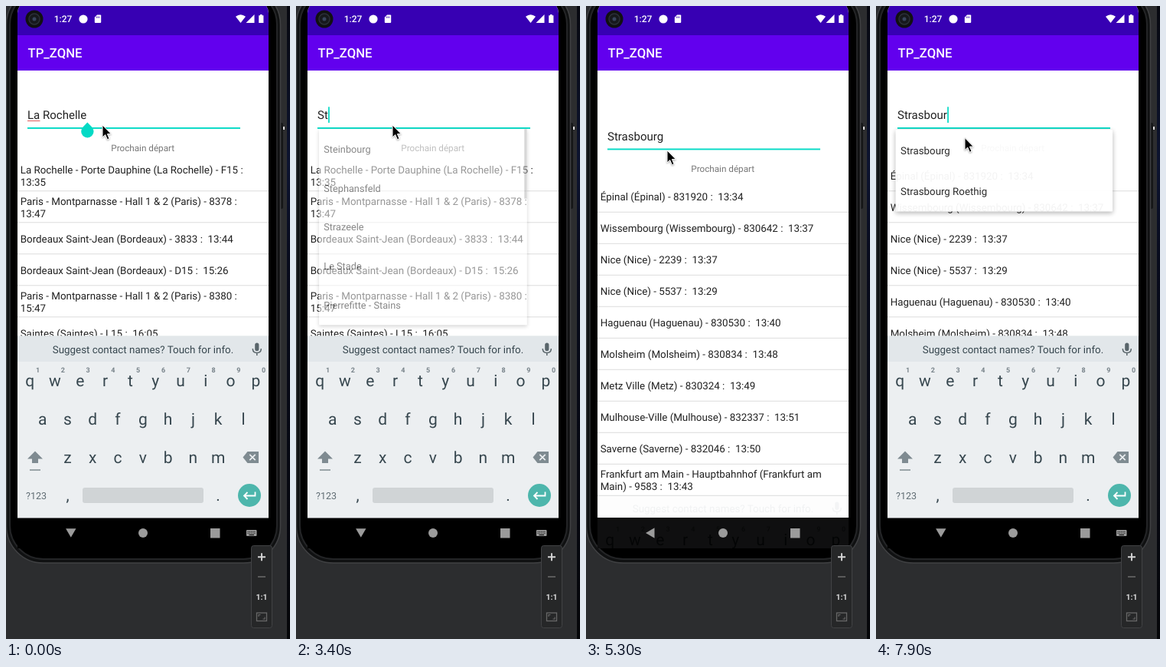
An HTML page for the animation above (8 s loop, 371x824 px).

```html
<!DOCTYPE html>
<html lang="fr">
<head>
<meta charset="utf-8">
<title>Prochain départ</title>
<style>
  html, body { margin: 0; width: 100%; height: 100%; overflow: hidden; background: #2c2d2f; }
  svg { display: block; width: 100vw; height: 100vh; }
  text { font-family: Roboto, sans-serif; white-space: pre; text-rendering: geometricPrecision; }
  .body { font-size: 13.36px; fill: #212121; }
  .mid { text-anchor: middle; }
  .key { font-size: 21px; fill: #37474f; text-anchor: middle; }
  .digit { font-size: 9px; font-weight: 700; fill: #78838a; text-anchor: middle; }
  #card { filter: drop-shadow(0 2px 3px rgba(0, 0, 0, .32)); }
</style>
</head>
<body>
<svg viewBox="0 0 371 824">
  <defs>
    <linearGradient id="night" x2="0" y2="1">
      <stop offset="0" stop-color="#07080f"/>
      <stop offset=".25" stop-color="#0d1430"/>
      <stop offset=".4" stop-color="#080b1c"/>
      <stop offset="1" stop-color="#050609"/>
    </linearGradient>
    <clipPath id="app"><rect x="15" y="84" width="328" height="582"/></clipPath>
    <clipPath id="aboveKeys"><rect x="15" y="84" width="328" height="345.5"/></clipPath>
    <clipPath id="display"><rect x="15" y="0" width="328" height="706"/></clipPath>
  </defs>

  <!-- emulator window and phone body -->
  <rect width="371" height="824" fill="#2c2d2f"/>
  <rect x="367" width="4" height="824" fill="url(#night)"/>
  <rect x="357" y="152" width="5" height="112" rx="2" fill="#151617"/>
  <rect x="362" y="157" width="2" height="4" fill="#ddd"/>
  <rect x=".5" y="-24" width="358" height="749" rx="48" fill="#101112" stroke="#404143" stroke-width="1.5"/>
  <rect x="5" y="-20" width="349" height="740" rx="44" fill="#000" stroke="#242527" stroke-width="2"/>

  <!-- screen -->
  <path d="M15 666V9Q15 4 18 0H340Q343 4 343 9V666Z" fill="#fff"/>
  <g clip-path="url(#app)">
    <g id="page">
      <text id="field" x="28" y="147.3" font-size="15.03" fill="#212121"/>
      <text id="hint" x="28" y="147.3" font-size="15.03" fill="#808080">Ville</text>
      <path id="typo" d="M28 149.5H44.5" stroke="#e57373" stroke-width="1.3"/>
      <rect x="28" y="158" width="278" height="1.9" fill="#03dac5"/>
      <rect id="caret" y="131.3" width="1.7" height="20.7" fill="#03dac5"/>
      <text class="mid" x="178.7" y="188.8" font-size="11.69" fill="#757575">Prochain départ</text>
      <g id="departures"></g>
      <path id="handle" d="M0 151.5L5.8 157.4A8.2 8.2 0 1 1 -5.8 157.4Z" fill="#03dac5"/>
    </g>
  </g>
  <g clip-path="url(#aboveKeys)">
    <g id="popup">
      <rect id="card" x="25" y="161" width="285" fill="#fff" rx="1"/>
      <g id="choices"></g>
      <rect id="bar" x="306.3" y="161" width="3.5" fill="#b4b4b4"/>
    </g>
  </g>
  <path d="M15 38V9Q15 4 18 0H340Q343 4 343 9V38Z" fill="#3700b3"/>
  <rect x="15" y="38" width="328" height="46" fill="#6200ee"/>
  <text x="28.5" y="67" font-size="16.7" font-weight="500" fill="#fff">TP_ZQNE</text>

  <!-- status bar -->
  <circle cx="37" cy="17" r="11.5" fill="#111"/>
  <circle cx="37" cy="17" r="7" fill="#17191d" stroke="#2c3038" stroke-width="1.5"/>
  <circle cx="37" cy="17" r="2.5" fill="#39455c"/>
  <g fill="#fff">
    <text x="62.8" y="21.2" font-size="12" font-weight="500">1:27</text>
    <circle cx="101" cy="17" r="5.6"/>
    <path d="M119 11.5H123.2Q124.2 11.5 124.2 12.5V21Q124.2 22 123.2 22H116.8Q115.8 22 115.8 21V14.7Z"/>
    <path d="M300 13.8Q306.5 8.8 313 13.8L306.5 22Z"/>
    <path d="M324.5 11V22H313.5Z"/>
    <path d="M332 11H334.6V12.3H336.4V22H330.2V12.3H332Z"/>
  </g>
  <path d="M118.2 13.6V15.6M120 13.6V15.6M121.8 13.6V15.6" stroke="#3700b3" stroke-width=".9"/>

  <!-- navigation bar and keyboard -->
  <rect x="15" y="666" width="328" height="40" fill="#000"/>
  <g clip-path="url(#display)"><g id="keyboard"></g></g>
  <g fill="#9b9b9b">
    <path id="back" d="M78 686L89.5 679.3V692.7Z"/>
    <circle cx="179" cy="686" r="6"/>
    <rect x="267" y="680" width="12.5" height="12.5"/>
    <g id="imeIcon">
      <rect x="314" y="682" width="13.5" height="8" rx="1"/>
      <path d="M315.5 684.2H326.5M315.5 686.3H326.5" stroke="#000" stroke-width="1" stroke-dasharray="1.2 1"/>
      <path d="M317.5 688.5H324" stroke="#000"/>
    </g>
  </g>

  <!-- emulator zoom buttons -->
  <g fill="none" stroke="#686868" stroke-width="1.6">
    <rect x="320.5" y="702.5" width="27" height="107" rx="3" fill="#262728" stroke="#414244" stroke-width="1"/>
    <path d="M329 717.2H339M334 712.2V722.2" stroke="#d5d5d5" stroke-width="1.9"/>
    <path d="M329 743H339"/>
    <rect x="327.5" y="790" width="13" height="10.5" stroke-width="1.3"/>
    <path d="M330 795V792.5H332.5M335.5 798H338V795.5" stroke-width="1.1"/>
  </g>
  <text class="mid" x="334" y="773" font-size="10.5" font-weight="700" fill="#d8d8d8">1:1</text>

  <path id="mouse" d="M0 0V16L3.7 12.6L6.4 18.8L9 17.7L6.4 11.6H11.3Z" fill="#000" stroke="#fff" stroke-width="1"
        style="filter: drop-shadow(0 1px 1px rgba(0, 0, 0, .35))"/>
</svg>

<script>
const LOOP = 8000, TICK = 100;
const $ = id => document.getElementById(id);
const label = (x, y, s, cls, more = '') => `<text x="${x}" y="${y}" class="${cls}" ${more}>${s}</text>`;
const clamp = v => Math.max(0, Math.min(1, v));

const ROCHELLE = [
  'La Rochelle - Porte Dauphine (La Rochelle) - F15 :|13:35',
  'Paris - Montparnasse - Hall 1 &amp; 2 (Paris) - 8378 :|13:47',
  'Bordeaux Saint-Jean (Bordeaux) - 3833 :  13:44',
  'Bordeaux Saint-Jean (Bordeaux) - D15 :  15:26',
  'Paris - Montparnasse - Hall 1 &amp; 2 (Paris) - 8380 :|15:47',
  'Saintes (Saintes) - L15 :  16:05'
];
const STRASBOURG = [
  'Épinal (Épinal) - 831920 :  13:34',
  'Wissembourg (Wissembourg) - 830642 :  13:37',
  'Nice (Nice) - 2239 :  13:37',
  'Nice (Nice) - 5537 :  13:29',
  'Haguenau (Haguenau) - 830530 :  13:40',
  'Molsheim (Molsheim) - 830834 :  13:48',
  'Metz Ville (Metz) - 830324 :  13:49',
  'Mulhouse-Ville (Mulhouse) - 832337 :  13:51',
  'Saverne (Saverne) - 832046 :  13:50',
  'Frankfurt am Main - Hauptbahnhof (Frankfurt am|Main) - 9583 :  13:43'
];

// Tracks hold [start time, value...]; the last entry already started applies.
const typed = [
  [0, 'La Rochelle'], [700, 'La Rochell'], [800, 'La Rochel'], [900, 'La Roche'], [1500, 'La Roch'],
  [2000, 'La Roc'], [2100, 'La Ro'], [2200, 'La R'], [2300, 'La '], [2400, 'La'], [2700, ''],
  [3100, 'S'], [3400, 'St'], [3700, 'Str'], [3900, 'Stra'], [4000, 'Stras'],
  [4800, 'Strasbourg'], [7700, 'Strasbour']
];
const pair = ['Strasbourg', 'Strasbourg Roethig'];
const suggested = [
  [0, [], 0],
  [800, ['La Rochelle Porte Dauphine', 'La Rochelle'], 0],
  [900, ['La Rochefoucauld', 'La Rochelle Porte Dauphine', 'La Roche-sur-Yon', 'La Rochelle', 'La Roche-Maurice'], 225],
  [2300, ['La Rochefoucauld', 'La Ciotat', 'La Souterraine', 'La Rochelle', 'La Verpillière'], 60],
  [2700, [], 0],
  [3400, ['Steinbourg', 'Stephansfeld', 'Strazeele', 'Le Stade', 'Pierrefitte - Stains'], 95],
  [3800, ['Strazeele', 'Strasbourg', 'Strasbourg Roethig'], 0],
  [4000, pair, 0], [5000, [], 0], [7800, pair, 0]
];
const caretTrack = [
  [0, 0], [200, 1], [1400, 0], [1500, 1], [4500, 0], [4800, 1],
  [5300, 0], [5900, 1], [6400, 0], [6900, 1], [7400, 0], [7700, 1]
];
const mouseTrack = [
  [0, 126, 155], [4300, 128, 155], [4400, 122, 166], [4500, 111, 181], [4600, 106, 188],
  [6100, 112, 176], [6200, 116, 171.5]
];
const at = (track, t) => track.findLast(entry => entry[0] <= t);

function drawKeyboard() {
  const row = (letters, x, y) => [...letters].map((c, i) => label(x + 32.8 * i, y, c, 'key')).join('');
  $('keyboard').innerHTML = `
    <rect x="15" y="429.5" width="328" height="237" fill="#eceff1"/>
    <rect x="15" y="429.5" width="328" height="33.5" fill="#e2e7ea"/>
    ${label(179, 452, 'Suggest contact names? Touch for info.', 'body mid', 'style="fill:#37474f"')}
    <rect x="325.2" y="438.5" width="5.2" height="10.5" rx="2.6" fill="#59656b"/>
    <path d="M322.3 446Q322.3 451.5 327.8 451.5T333.3 446M327.8 451.5V455" fill="none" stroke="#59656b" stroke-width="1.5"/>
    ${row('qwertyuiop', 31.2, 495)}${row('asdfghjkl', 47.6, 545)}${row('zxcvbnm', 80.4, 595)}
    ${[...'1234567890'].map((c, i) => label(41.5 + 32.8 * i, 476.8, c, 'digit')).join('')}
    <path d="M38 579.5L48 589.5H42V595H34V589.5H28Z" fill="#7f8b91"/>
    <path d="M31 604H45" stroke="#7f8b91" stroke-width="1.5"/>
    <path d="M309.5 587.5L315.5 580H330V595H315.5Z" fill="#7f8b91"/>
    <path d="M318.3 583.8L325.7 591.2M325.7 583.8L318.3 591.2" stroke="#eceff1" stroke-width="1.7"/>
    ${label(39.5, 642, '?123', 'mid', 'font-size="12.5" fill="#5f6c73"')}
    ${label(80.5, 644, ',', 'key')}${label(277, 644, '.', 'key')}
    <rect x="100" y="627" width="158" height="20" rx="3" fill="#d0d4d6"/>
    <circle cx="318" cy="637" r="15" fill="#4db6ac"/>
    <path d="M325.5 632.5V637.5H311.5M315.5 633L311 637.5L315.5 642" fill="none" stroke="#fff" stroke-width="1.8"/>`;
}

function drawDepartures(rows) {
  $('departures').innerHTML = rows.map((row, i) => {
    const lines = row.split('|'), mid = 221 + 41 * i;
    const first = mid + 4.7 - 7.9 * (lines.length - 1);
    return lines.map((s, n) => label(18.7, first + 15.8 * n, s, 'body')).join('') +
      `<rect x="15" y="${mid + 19.3}" width="328" height="1" fill="#dcdcdc"/>`;
  }).join('');
}

function drawPopup(items, thumb) {
  $('card').setAttribute('height', 53.45 * items.length + .3);
  $('choices').innerHTML = items.map((s, i) => label(31.5, 192.8 + 53.45 * i, s, 'body')).join('');
  $('bar').setAttribute('height', thumb);
}

// Opacity of the suggestion list: eases out on opening, linear on dismissal.
function popupAlpha(t) {
  if (t >= 4800 && t < 5000) return 1 - (t - 4700) / 300;
  const opened = [7800, 3400, 800].find(start => start <= t);
  return 1 - (1 - clamp((t - opened + 70) / 220)) ** 2;
}

// How far the keyboard has left the screen: 0 shown, 1 gone.
function keyboardAway(t) {
  return t < 7100 ? clamp((t - 5100) / 213.6) ** 2 : (1 - clamp((t - 7100) / 400)) ** 2;
}

const show = (id, alpha) => $(id).setAttribute('opacity', alpha);
const move = (id, transform) => $(id).setAttribute('transform', transform);
let shownRows, shownPopup, lastTick = -1;

function render(t) {
  const text = at(typed, t)[1];
  $('field').textContent = text;
  const end = 28 + (text ? $('field').getComputedTextLength() : 0);
  show('hint', text ? 0 : 1);
  show('typo', text.startsWith('La') ? 1 : 0);
  $('caret').setAttribute('x', end + .3);
  show('caret', at(caretTrack, t)[1]);
  move('handle', `translate(${end + 1.2} 0)`);
  show('handle', t < 700 ? 1 : t < 6900 || t >= 7700 ? 0 : clamp((t - 6900) / 400));
  move('page', `translate(0 ${t >= 5200 && t < 7300 ? 27.5 : 0})`);

  const rows = t < 5200 ? ROCHELLE : STRASBOURG;
  if (rows !== shownRows) drawDepartures(shownRows = rows);

  const list = at(suggested, t);
  if (list !== shownPopup) drawPopup((shownPopup = list)[1], list[2]);
  const alpha = list[1].length ? popupAlpha(t) : 0;
  const scale = t >= 4800 && t < 5000 ? 1 : .9 + .1 * alpha;
  show('popup', alpha);
  move('popup', `translate(134 145) scale(${scale}) translate(-134 -145)`);

  const away = keyboardAway(t);
  show('keyboard', clamp(1 - 1.07 * away));
  move('keyboard', `translate(0 ${236 * away})`);
  move('back', t >= 5200 && t < 7200 ? '' : 'rotate(-90 84.3 685.5)');
  show('imeIcon', t >= 5200 && t < 7000 ? 0 : 1);

  const [, x, y] = at(mouseTrack, t);
  move('mouse', `translate(${x} ${y})`);
}

drawKeyboard();
const start = performance.now();
function frame() {
  const elapsed = (performance.now() - start) % LOOP;
  const tick = Math.floor(elapsed / TICK) * TICK;
  if (tick !== lastTick) render(lastTick = tick);
  requestAnimationFrame(frame);
}
frame();
</script>
</body>
</html>
```
